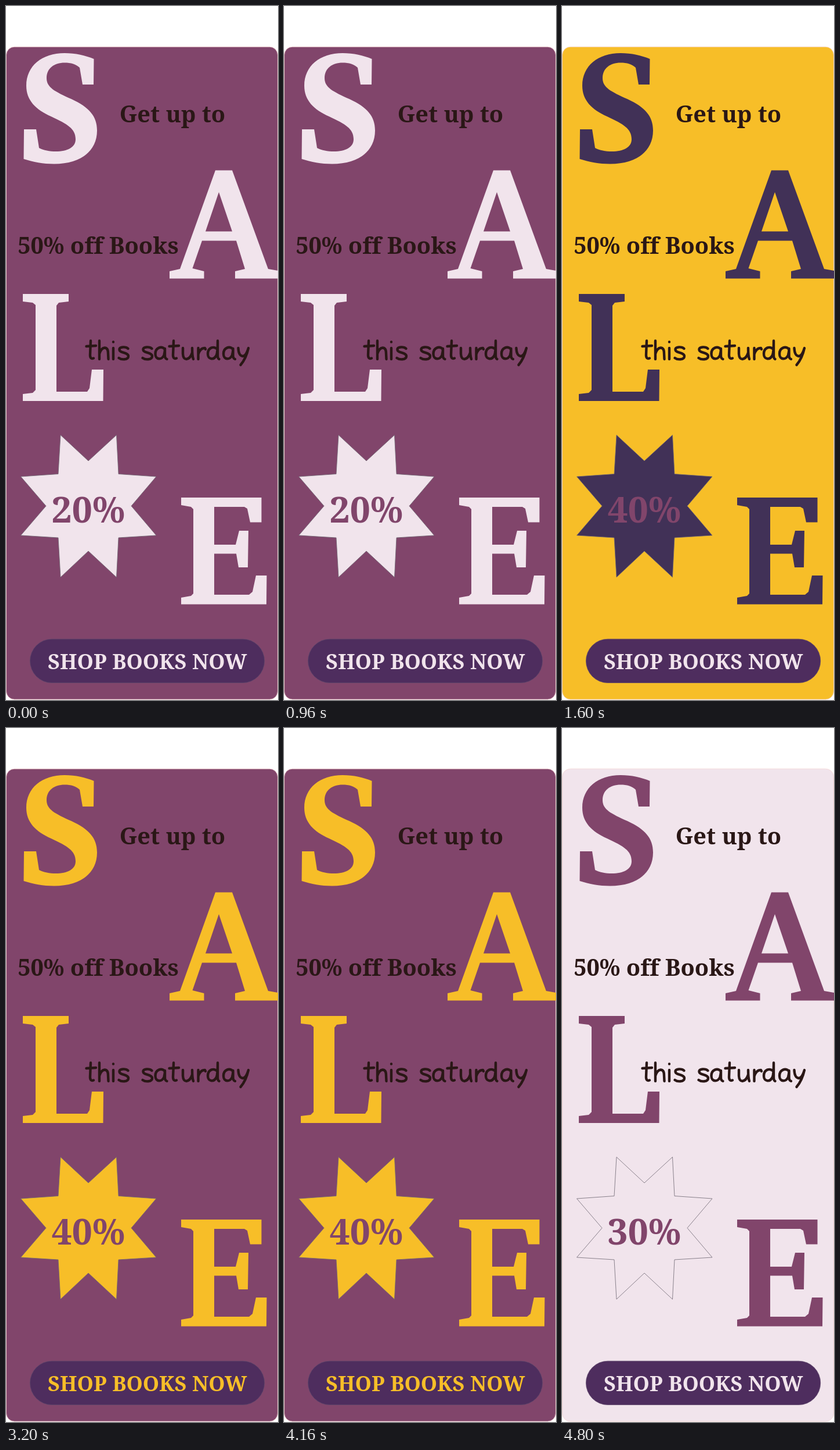
Write an HTML page that moves like this. It is 469 px wide and 1193 px high and loops after 6.4 s.

```html
<!DOCTYPE html>
<html lang="en">
<head>
<meta charset="utf-8">
<title>Book sale banner</title>
<style>
  :root { --plum: #81456b; --gold: #f7be28; --pale: #f1e4ec; --night: #413157; }
  html, body { margin: 0; width: 100%; height: 100%; overflow: hidden; background: #fff; }
  svg { position: fixed; inset: 0; width: 100%; height: 100%; display: block; }
  text {
    font-family: "Noto Serif", "DejaVu Serif", serif;
    font-weight: 600;
    font-variant-ligatures: none;
    text-anchor: middle;
  }
  .line { font-size: 39.7px; fill: #2a1716; }
  .pct { font-size: 62.5px; fill: var(--plum); }
  .cta { font-size: 36px; }
  .hand { fill: none; stroke: #2a1716; stroke-width: 4.4; stroke-linecap: round; stroke-linejoin: round; }

  .panel, .tint, .cta, .pct { animation: 6.4s step-end infinite; }
  .panel { animation-name: panel; }
  .tint { animation-name: tint; }
  .cta { animation-name: cta; }
  .p20 { animation-name: p20; }
  .p40 { animation-name: p40; }
  .p30 { animation-name: p30; }

  @keyframes panel {
    0%, 50% { fill: var(--plum); }
    25% { fill: var(--gold); }
    75%, 100% { fill: var(--pale); }
  }
  @keyframes tint {
    0% { fill: var(--pale); }
    25% { fill: var(--night); }
    50% { fill: var(--gold); }
    75%, 100% { fill: var(--plum); }
  }
  /* the badge blends into the panel in the last scene */
  .star { animation-name: star; }
  @keyframes star {
    0%, 75%, 100% { fill: var(--pale); }
    25% { fill: var(--night); }
    50% { fill: var(--gold); }
  }
  @keyframes cta {
    0%, 25%, 75%, 100% { fill: var(--pale); }
    50% { fill: var(--gold); }
  }
  @keyframes p20 { 0% { opacity: 1; } 25%, 100% { opacity: 0; } }
  @keyframes p40 { 0%, 75%, 100% { opacity: 0; } 25% { opacity: 1; } }
  @keyframes p30 { 0% { opacity: 0; } 75%, 100% { opacity: 1; } }
</style>
</head>
<body>
<svg viewBox="0 0 469 1193" preserveAspectRatio="none">
  <defs>
    <path id="t" d="M146 575.5 L145 600 Q145 607.5 151 605.5 M138.5 585 L155 584"/>
    <path id="s" d="M210.5 589 C207 585.5 195 585 195.5 591 C196 597 211 595 211 602 C211 608.5 199 608.5 194.5 605"/>
    <path id="a" d="M274 590 C268 584 257.5 587 257.5 598 C257.5 608.5 269 609 272.5 600 Q274 595 274 589 V601 Q274 606 277.5 607"/>
  </defs>

  <rect class="panel" x=".5" y="70.2" width="468" height="1121.8" rx="14" stroke="#f5d5d2" stroke-width=".8"/>

  <g class="tint" role="img" aria-label="SALE">
    <path d="M151.5 91 C137 85 120 81 101 81 C62 81 35 103 35 137 C35 162 51 178 78 190 C106 203 120 211 120 229 C120 243 106 250 86 250 C75 250 65 248 57 244 L52 212 H31 L30.500 263 C47 268 64 271.500 83 271.500 C128 271.500 157 250 157 214 C157 189 143 174 113 160 C84 147 70 140 70 124 C70 107 83 97.500 101 97.500 C112 97.500 121 100 127 106 L132 135 H151 Z"/>
    <path fill-rule="evenodd" d="M361 282.500 H390 L452 452 L469 455 V468.500 H395 V456 L412 452 L397 403.500 H338 L321.500 451 L341.500 456 V468.500 H282 V456 L300 452 Z M367 320 L344 387.500 H390 Z"/>
    <path d="M29 495 H108 V508 L91 510 L87 515 V663 H140 L144 657 L148 625 H168 L167.500 679 H29 V667 L46 665 L51 660 V514 L46 510 L29 508 Z"/>
    <path d="M302 845 H440.500 V887.500 H421 L416 864 L411 861 H359 V926 H396 L402 902 H418 L417 965 H401 L397 941.500 H359 V1012 H419 L425 1007 L431 979 H449.500 L449 1028.500 H302 V1017 L319 1014 L323 1010 V865 L319 861 L302 858 Z"/>
  </g>

  <text class="line" x="287" y="200">Get up to</text>
  <text class="line" x="159" y="425.5">50% off Books</text>

  <g class="hand" role="img" aria-label="this saturday">
    <use href="#t"/>
    <path d="M161 575.5 V607 M161 598 Q164 588 170 587.5 Q176 587.5 176 597 L176.5 607"/>
    <path d="M185 588 V607 M185 577.5 V577.6"/>
    <use href="#s"/>
    <use href="#s" x="41"/>
    <use href="#a"/>
    <use href="#t" x="143"/>
    <path d="M305 588 V598 Q305.5 607 311 607 Q318 606 321 596 M321 588 Q321 602 323 607"/>
    <path d="M331.5 588 V607 M331.5 599 Q334.5 588 343 588 L344 590"/>
    <path d="M364.5 590 C358 584 348 587 348 598 C348 608.500 359 609 363 600 Q365 595 365 575.5 V601 Q365 606 367.500 607"/>
    <use href="#a" x="117.5"/>
    <path d="M400.5 588 Q401 601 408 602 Q414 601.5 418 588 Q414 606 404.5 617"/>
  </g>

  <path class="tint star" stroke="#6f6873" stroke-width=".8"
    d="M94 737.5 L142 782 L190.500 737.5 L194 804.5 L259 809 L216 859.5 L259 910 L194 914 L190.500 982 L142 937 L94 982 L90 914 L25.5 910 L69 859.5 L25.5 809 L90 804.5 Z"/>
  <text class="pct p20" x="142" y="888">20%</text>
  <text class="pct p40" x="142" y="888">40%</text>
  <text class="pct p30" x="142" y="888">30%</text>

  <rect x="41.4" y="1088.2" width="404.3" height="75.3" rx="37.6" fill="#4e2d5e" stroke="#5f4a6c" stroke-width=".7"/>
  <text class="cta" x="243.7" y="1140">SHOP BOOKS NOW</text>
</svg>
</body>
</html>
```
